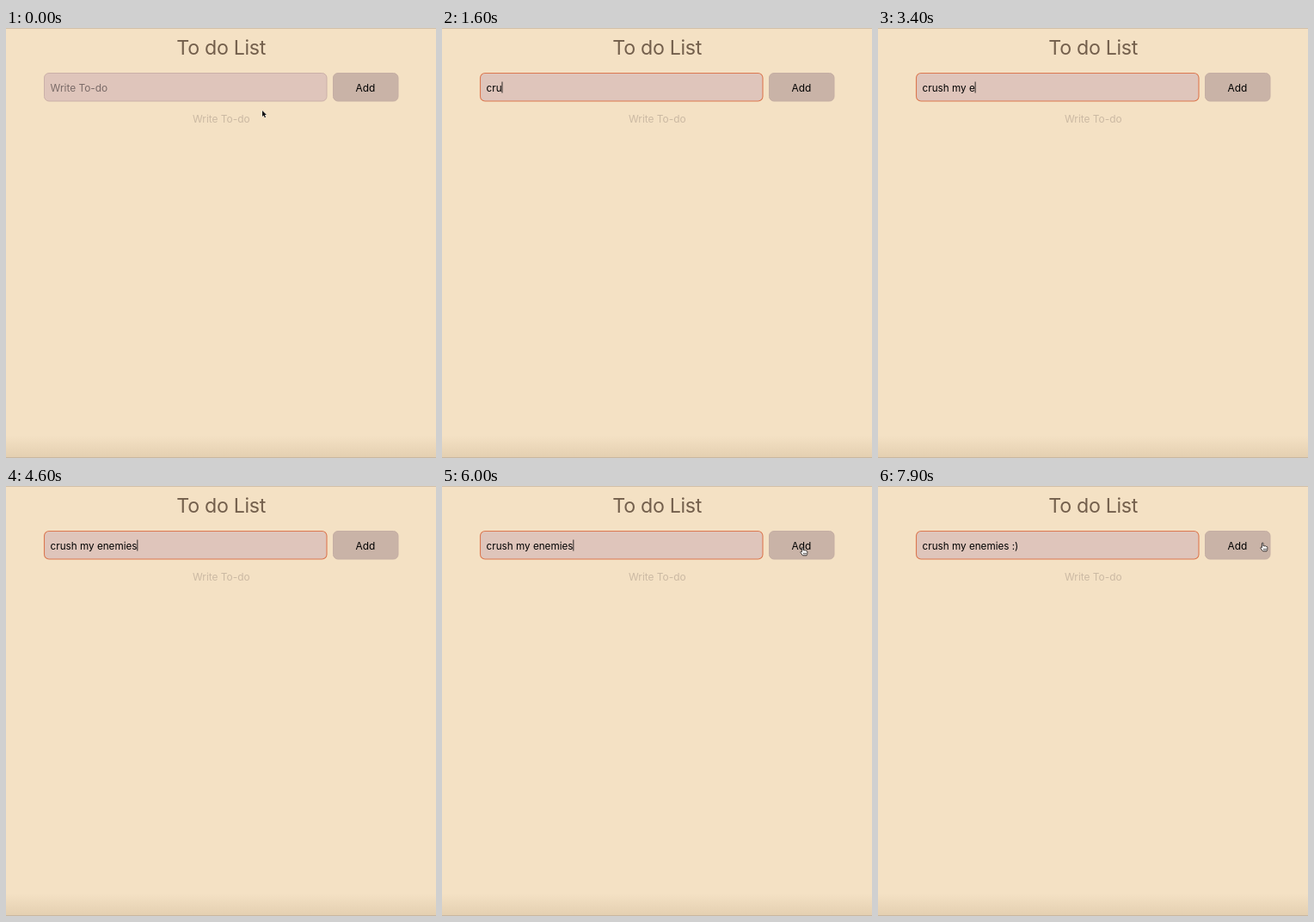
Recreate the animation shown at these times as an HTML page with a canvas. Size 500x500 px, loop 8000 ms.

```html
<!DOCTYPE html>
<html lang="en">
<head>
<meta charset="utf-8">
<title>To do List</title>
<style>
html, body { margin: 0; width: 100%; height: 100%; overflow: hidden; background: #f4e1c4; }
canvas { display: block; width: 500px; height: 500px; }
</style>
</head>
<body>
<canvas id="stage"></canvas>
<script>
const LOOP = 8000, STEP = 100;
const FONT = 'Inter, "Liberation Sans", sans-serif';
const TEXT = 'crush my enemies :) ';
const KEYS = [700, 1500, 1600, 1900, 2000, 2400, 2500, 3100, 3200, 3400,
  3500, 3600, 3900, 4200, 4300, 4600, 6500, 7000, 7100, 7200];
const FOCUS = 300;

// Pointer sections: time, x, y
const PATHS = [
  [[0, 298, 96], [100, 300, 91], [300, 303, 75], [700, 303, 75]],
  [[5100, 303, 75], [5300, 330, 74], [5600, 390, 75], [5900, 420, 76],
   [6000, 421, 76], [6300, 422, 76], [6500, 422, 76]],
  [[7600, 424, 74], [7700, 440, 65], [7800, 452, 64], [7900, 449, 71], [8000, 449, 71]]
];

const canvas = document.getElementById('stage');
const ctx = canvas.getContext('2d');
const dpr = window.devicePixelRatio || 1;
canvas.width = canvas.height = 500 * dpr;
ctx.scale(dpr, dpr);

function box(x, y, w, h, r, fill, stroke, line = 1) {
  ctx.beginPath();
  ctx.roundRect(x, y, w, h, r);
  ctx.fillStyle = fill;
  ctx.fill();
  ctx.strokeStyle = stroke;
  ctx.lineWidth = line;
  ctx.stroke();
}

function label(str, x, y, size, color, align = 'left', spacing = 0) {
  ctx.font = `${size}px ${FONT}`;
  ctx.letterSpacing = spacing + 'px';
  ctx.textAlign = align;
  ctx.fillStyle = color;
  ctx.fillText(str, x, y);
  return ctx.measureText(str).width;
}

function pointerAt(t) {
  const path = PATHS.find(p => t >= p[0][0] && t < p[p.length - 1][0]);
  if (!path) return null;
  const i = path.findIndex(p => p[0] > t);
  const [t0, x0, y0] = path[i - 1], [t1, x1, y1] = path[i];
  const k = (t - t0) / (t1 - t0);
  return [x0 + (x1 - x0) * k, y0 + (y1 - y0) * k];
}

function drawArrow(x, y) {
  ctx.save();
  ctx.translate(x, y);
  const p = new Path2D('M0 0V7L1.7 5.6L2.8 8.2L4 7.7L2.9 5.1H5Z');
  ctx.strokeStyle = 'rgba(255,255,255,.7)';
  ctx.lineWidth = 1;
  ctx.stroke(p);
  ctx.fillStyle = '#111';
  ctx.fill(p);
  ctx.restore();
}

function drawBeam(x, y) {
  ctx.strokeStyle = '#3b302d';
  ctx.lineWidth = 0.9;
  ctx.stroke(new Path2D(`M${x - 2} ${y - 5}q2 0 2 1.5v7q0 1.5 -2 1.5M${x + 2} ${y - 5}q-2 0 -2 1.5v7q0 1.5 2 1.5`));
}

function drawHand(x, y) {
  ctx.save();
  ctx.translate(x, y);
  const p = new Path2D('M-2.6 .8V-4Q-2.6 -5 -1.8 -5T-1 -4V-1.2Q0 -2 .8 -1Q1.8 -1.7 2.4 -.6Q3.8 -1 3.8 .5V2.4Q3.8 3.4 3 4.8H-1.5L-4 1.6Q-4.6 .4 -3.6 .2Z');
  ctx.fillStyle = '#fff';
  ctx.fill(p);
  ctx.strokeStyle = '#2b2523';
  ctx.lineWidth = 0.9;
  ctx.stroke(p);
  ctx.stroke(new Path2D('M-.3 1.8v1.6M1 1.8v1.6M2.2 1.8v1.6'));
  ctx.restore();
}

function drawPointer(t) {
  const pos = pointerAt(t);
  if (!pos) return;
  const [x, y] = pos;
  if (x > 380 && y < 85) drawHand(x, y);
  else if (x < 373 && y < 85) drawBeam(x, y);
  else drawArrow(x, y);
}

function drawPage() {
  ctx.fillStyle = '#f4e1c4';
  ctx.fillRect(0, 0, 500, 500);
  const shade = ctx.createLinearGradient(0, 474, 0, 500);
  shade.addColorStop(0, 'rgba(214,192,160,0)');
  shade.addColorStop(1, 'rgba(214,192,160,.55)');
  ctx.fillStyle = shade;
  ctx.fillRect(0, 474, 500, 26);
  ctx.fillStyle = '#d2c0a8';
  ctx.fillRect(0, 0, 500, 1);
  ctx.fillStyle = '#c8b7a0';
  ctx.fillRect(0, 499, 500, 1);
  label('To do List', 250.2, 31, 23.2, '#735f4c', 'center', -0.3);
  label('Write To-do', 250.3, 110.3, 11.9, '#cbb9a3', 'center');
  box(380.5, 52.5, 75.5, 32.5, 5.5, '#c9b3a7', '#c5aea3');
  label('Add', 418, 73.7, 11.9, '#000', 'center');
}

function drawInput(t) {
  const focused = t >= FOCUS;
  box(44.5, 52.5, 328.5, 32.5, 5.5, '#dfc5bb', focused ? '#dc7850' : '#cbb0a8', focused ? 1.1 : 1);
  const typed = KEYS.filter(k => k <= t);
  const str = TEXT.slice(0, typed.length);
  const w = str ? label(str, 51.6, 73.7, 11.7, '#000') : 0;
  if (!str) label('Write To-do', 51.6, 73.7, 11.9, '#7a6b68');
  const last = typed.length ? typed[typed.length - 1] : FOCUS;
  if (focused && (t - last) % 1000 < 500) {
    ctx.fillStyle = '#000';
    ctx.fillRect(51.6 + w, 62.5, 0.8, 13);
  }
}

function frame() {
  const t = Math.floor(performance.now() % LOOP / STEP) * STEP;
  drawPage();
  drawInput(t);
  drawPointer(t);
  requestAnimationFrame(frame);
}
frame();
</script>
</body>
</html>
```
